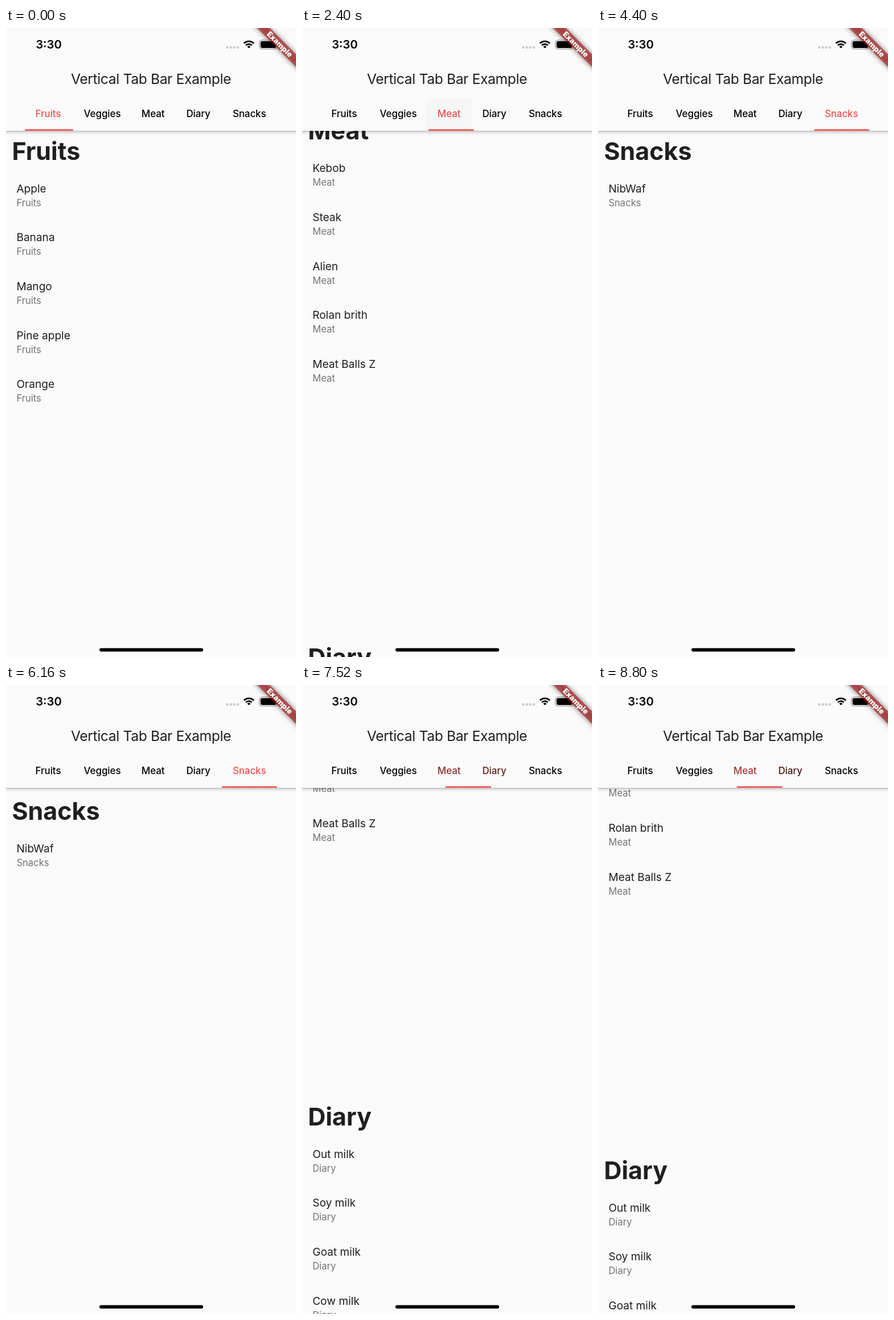
Recreate the animation shown at these times as an HTML page. Size 509x1101 px, loop 8880 ms.

```html
<!DOCTYPE html>
<html lang="en">
<head>
<meta charset="utf-8">
<title>Vertical Tab Bar Example</title>
<style>
  html, body { margin: 0; width: 100%; height: 100%; overflow: hidden; background: #fafafa; }
  svg { display: block; width: 100%; height: 100%; }
  text { font-family: Inter, Roboto, sans-serif; font-optical-sizing: none; fill: #1f1f1f; white-space: pre; }
  .head { font-size: 43px; font-weight: 700; }
  .item { font-size: 19.1px; }
  .sub { font-size: 16.6px; fill: #757575; }
  .tab { font-size: 16.9px; font-weight: 500; letter-spacing: -.05px; }
  .title { font-size: 24.6px; letter-spacing: -.35px; text-anchor: middle; }
  .clock { font-size: 20.3px; font-weight: 600; fill: #000; }
  .ribbon { font-size: 13.3px; font-weight: 900; fill: #fff; text-anchor: middle; }
</style>
</head>
<body>
<svg viewBox="0 0 509 1101">
  <defs>
    <linearGradient id="shade" x1="0" y1="0" x2="0" y2="1">
      <stop offset="0" stop-color="#000" stop-opacity=".27"/>
      <stop offset=".35" stop-color="#000" stop-opacity=".1"/>
      <stop offset="1" stop-color="#000" stop-opacity="0"/>
    </linearGradient>
    <filter id="blur" x="-20%" y="-150%" width="140%" height="400%">
      <feGaussianBlur stdDeviation="4.6"/>
    </filter>
  </defs>
  <rect width="509" height="1101" fill="#fafafa"/>
  <g id="pages"></g>

  <rect y="180" width="509" height="7" fill="url(#shade)"/>
  <rect width="509" height="180" fill="#fafafa"/>
  <text class="title" x="254.5" y="98">Vertical Tab Bar Example</text>
  <rect id="press" y="123" height="57"/>
  <g id="tabs"></g>
  <rect id="bar" y="177.2" height="2.6" fill="#ef5350"/>

  <text class="clock" x="52.2" y="36">3:30</text>
  <g fill="#cdcdcd">
    <circle cx="388.2" cy="34" r="2.3"/><circle cx="394.5" cy="34" r="2.3"/>
    <circle cx="400.7" cy="34" r="2.3"/><circle cx="407" cy="34" r="2.3"/>
  </g>
  <g transform="translate(426.3 35.6)" fill="none" stroke="#000" stroke-width="2.8">
    <path d="M-8.6 -8.6A12.2 12.2 0 0 1 8.6 -8.6"/>
    <path d="M-5.3 -5.3A7.5 7.5 0 0 1 5.3 -5.3"/>
    <path d="M0 0L-3 -3A4.3 4.3 0 0 1 3 -3Z" fill="#000" stroke="none"/>
  </g>
  <rect x="444.6" y="21.1" width="32" height="15.8" rx="5" fill="none" stroke="#000" stroke-opacity=".4" stroke-width="1.3"/>
  <rect x="446.7" y="23.1" width="27.8" height="11.8" rx="3.2"/>

  <g transform="translate(509 0) rotate(45)">
    <rect x="-60" y="32.5" width="120" height="15.7" fill-opacity=".5" filter="url(#blur)"/>
    <rect x="-60" y="32.5" width="120" height="15.7" fill="#b71c1c" fill-opacity=".627"/>
    <text class="ribbon" x="0" y="45">Example</text>
  </g>
  <rect x="164" y="1085.5" width="182" height="6" rx="3"/>
</svg>
<script>
const LOOP = 8880, STEP = 80, PAGE = 921.6, ROW = 85.58;
const names = ['Fruits', 'Veggies', 'Meat', 'Diary', 'Snacks'];
const labelX = [51.6, 136.6, 237.8, 316.4, 397.9];
const edges = [33.3, 117.8, 219, 298.3, 379.4, 476];
const lists = [
  ['Apple', 'Banana', 'Mango', 'Pine apple', 'Orange'],
  [],
  ['Kebob', 'Steak', 'Alien', 'Rolan brith', 'Meat Balls Z'],
  ['Out milk', 'Soy milk', 'Goat milk', 'Cow milk', 'Camel milk', 'Buffalo milk', 'Hen milk'],
  ['NibWaf']
];

// Taps: finger down, page change start, tabs left and reached
const taps = [
  { down: 1190, go: 1294, from: 0, to: 3 },
  { down: 2070, go: 2174, from: 3, to: 2 },
  { down: 2950, go: 3054, from: 2, to: 0 },
  { down: 4085, go: 4094, from: 0, to: 4 }
];
// Finger drag: time, scroll position in pages
const drag = [
  [6000, 4], [6080, 3.997], [6160, 3.994], [6240, 3.994], [6320, 3.9], [6400, 3.6],
  [6480, 3.3], [6560, 3.12], [6640, 3.04], [6720, 3.01], [6800, 2.955], [7000, 2.75],
  [7520, 2.414], [8100, 2.2], [8800, 2.312]
];

const $ = id => document.getElementById(id);
const clamp = x => Math.max(0, Math.min(1, x));
const mix = (a, b, k) => a + (b - a) * k;

function make(tag, parent, attrs, text) {
  const el = document.createElementNS('http://www.w3.org/2000/svg', tag);
  for (const key in attrs) el.setAttribute(key, attrs[key]);
  if (text) el.textContent = text;
  return parent.appendChild(el);
}

const pages = names.map((name, i) => {
  const g = make('g', $('pages'), {});
  if (!lists[i].length) return g;
  make('text', g, { class: 'head', x: 10.4, y: 230.5 }, name);
  lists[i].forEach((item, n) => {
    make('text', g, { class: 'item', x: 18.4, y: 287.8 + n * ROW }, item);
    make('text', g, { class: 'sub', x: 18.4, y: 311.8 + n * ROW }, name);
  });
  return g;
});
const tabs = names.map((name, i) => make('text', $('tabs'), { class: 'tab', x: labelX[i], y: 156 }, name));

// cubic-bezier(.25, .1, .25, 1)
function ease(x) {
  if (x <= 0 || x >= 1) return clamp(x);
  let lo = 0, hi = 1, s = .5;
  for (let i = 0; i < 24; i++) {
    s = (lo + hi) / 2;
    if (.75 * s * (1 - s) + s ** 3 < x) lo = s; else hi = s;
  }
  return .3 * s * (1 - s) ** 2 + 3 * s * s * (1 - s) + s ** 3;
}

function dragAt(t) {
  const i = drag.findIndex(p => p[0] >= t);
  if (i < 1) return drag[i < 0 ? drag.length - 1 : 0][1];
  const [t0, a] = drag[i - 1], [t1, b] = drag[i];
  return mix(a, b, (t - t0) / (t1 - t0));
}

// Position on the tab strip, strength of each label, offset of each visible page
function stateAt(t) {
  const glow = [0, 0, 0, 0, 0], offsets = {};
  let pos;
  if (t >= drag[0][0]) {
    pos = dragAt(t);
    names.forEach((_, i) => {
      glow[i] = clamp(1 - Math.abs(pos - i));
      if (Math.abs(pos - i) < 1) offsets[i] = (i - pos) * PAGE;
    });
  } else {
    const tap = taps.filter(a => t >= a.go).pop() || { go: 0, from: 0, to: 0 };
    const p = tap.from === tap.to ? 1 : ease((t - tap.go) / 300);
    const dir = Math.sign(tap.to - tap.from);
    pos = mix(tap.from, tap.to, p);
    glow[tap.from] = 1 - p;
    glow[tap.to] = p;
    if (p < 1) offsets[tap.from] = -dir * p * PAGE;
    offsets[tap.to] = dir * (1 - p) * PAGE;
  }
  return { pos, glow, offsets };
}

function draw(t) {
  const { pos, glow, offsets } = stateAt(t);
  pages.forEach((g, i) => {
    g.style.display = i in offsets ? '' : 'none';
    if (i in offsets) g.setAttribute('transform', `translate(0 ${offsets[i].toFixed(2)})`);
  });
  tabs.forEach((el, i) => {
    el.style.fill = `rgb(${[239, 83, 80].map(c => Math.round(c * glow[i]))})`;
  });

  const i = Math.min(3, Math.floor(pos)), k = pos - i;
  const left = mix(edges[i], edges[i + 1], k), right = mix(edges[i + 1], edges[i + 2], k);
  $('bar').setAttribute('x', left);
  $('bar').setAttribute('width', right - left);

  const tap = taps.find(a => t >= a.down && t < a.go + 300);
  const alpha = tap ? .05 * clamp((t - tap.down) / 80) * clamp((tap.go + 290 - t) / 220) : 0;
  $('press').setAttribute('fill-opacity', alpha);
  if (tap) {
    $('press').setAttribute('x', edges[tap.to]);
    $('press').setAttribute('width', edges[tap.to + 1] - edges[tap.to]);
  }
}

const start = performance.now();
function tick() {
  const t = (performance.now() - start) % LOOP;
  draw(Math.floor(t / STEP) * STEP);
  requestAnimationFrame(tick);
}
tick();
</script>
</body>
</html>
```
